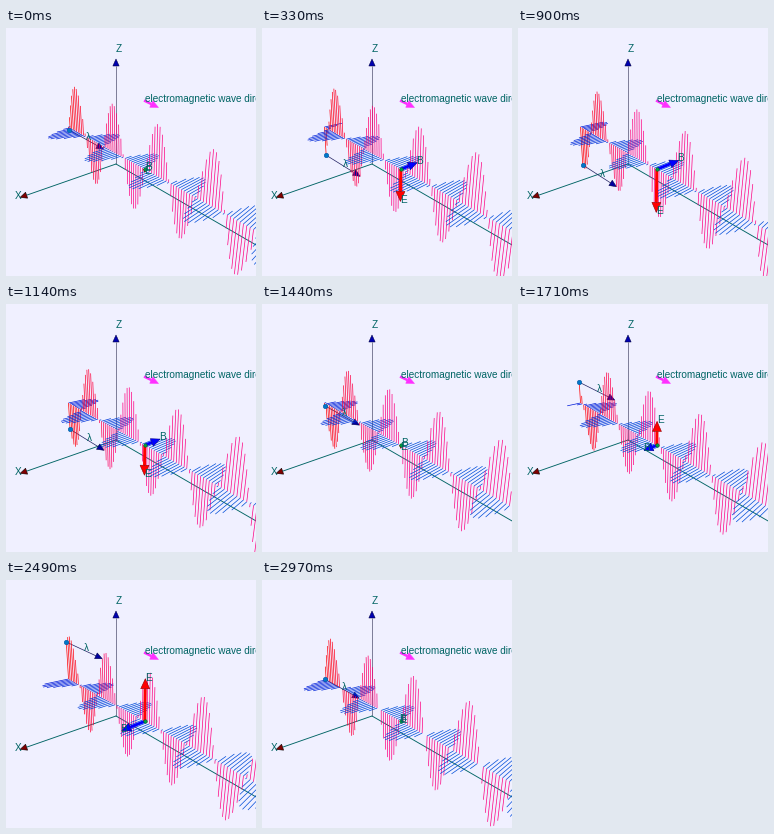
Write a matplotlib script that moves like this. It is 250 by 248 pixels and loops after 3000 ms.

```python
import numpy as np
import matplotlib.pyplot as plt
from matplotlib.animation import FuncAnimation
from matplotlib.collections import LineCollection

W, H, DPI = 250, 248, 72
FRAMES, STEP = 100, 30
BG, TEAL = "#f0f0ff", "#006464"
THIN = 0.7

# Perspective: start of the wave, vanishing points and depth weights
START = np.array([62.5, 99.0])
VP_X, VP_Y, VP_Z = np.array([[443, 18], [-338, -123], [126, 1170]], float)
K_X, K_Y, K_Z = -0.07, -0.08, -0.0395

PER_WAVE, WAVES = 20, 5
S = np.arange(PER_WAVE * WAVES + 1) / PER_WAVE


def project(s, e=0.0, b=0.0):
    """Screen position at s wavelengths, electric height e, magnetic reach b."""
    s, e, b = np.broadcast_arrays(s, e, b)
    ky, kz, kx = (v[..., None] for v in (s * K_Y, e * K_Z, b * K_X))
    return (START + ky * VP_Y + kz * VP_Z + kx * VP_X) / (1 + ky + kz + kx)


def field(s, phase):
    return np.sin(2 * np.pi * (s - phase))


plt.rcParams["font.family"] = "Liberation Sans"
fig = plt.figure(figsize=(W / DPI, H / DPI), dpi=DPI, facecolor=BG)
ax = fig.add_axes([0, 0, 1, 1])
ax.set(xlim=(0, W), ylim=(H, 0))
ax.axis("off")


def label(x, y, text, **kw):
    return ax.text(x, y, text, fontsize=10, color=TEAL, zorder=6, **kw)


class Arrow:
    def __init__(self, color, line, width, head, edge=None, z=4):
        self.head = head
        self.line, = ax.plot([], [], color=line, lw=width, zorder=z,
                             solid_capstyle="butt")
        self.tip, = ax.fill([0, 0, 0], [0, 0, 0], fc=color, ec=edge or color,
                            lw=0.5, zorder=z + 0.1)

    def place(self, a, b):
        a, b = np.asarray(a, float), np.asarray(b, float)
        size = np.hypot(*(b - a))
        u = (b - a) / max(size, 1e-6)
        n = np.array([-u[1], u[0]])
        h = min(self.head, size)
        base = b - u * h
        self.line.set_data(*np.transpose([a, base]))
        self.tip.set_xy([b, base + n * h * 0.45, base - n * h * 0.45])
        return self


# Fixed axes and direction mark
Arrow("#0000b0", "#505070", THIN, 7, "#000040", 1).place((110, 136), (110, 31))
Arrow("#800000", TEAL, 0.9, 7, "black", 1).place((110, 136), (14, 169.5))
far = VP_Y + (np.array([110, 136]) - VP_Y) * 1.4
ax.plot(*np.transpose([(110, 136), far]), color=TEAL, lw=0.9, zorder=1)
label(110, 24, "Z")
label(9, 171, "X")
label(139, 74, "electromagnetic wave direction", clip_on=True)
Arrow("#ff30ff", "#ff30ff", 2.5, 8, z=5).place((138, 72.5), (152.5, 79.5))

# Stems, electric and magnetic alternating along the wave
mix = np.clip(S / 1.5, 0, 1)[:, None]
red = (1 - mix) * [1, 0, 0] + mix * [1, 0, 0.5]
blue = (1 - mix) * [0, 0.1, 0.85] + mix * [0, 0.3, 0.85]
stems = LineCollection([], colors=np.stack([blue, red], 1).reshape(-1, 3),
                       linewidths=THIN, zorder=2)
ax.add_collection(stems)
axis = project(S)

span = Arrow("#0000a0", "#202060", THIN, 7, "#000040", 1.5)
dot, = ax.plot([], [], "o", ms=4.5, mfc="#0078c8", mec="#0050a0", mew=0.5,
               zorder=3)
lam = label(0, 0, "λ")
b_arrow = Arrow("#0000ff", "#0000ff", 3, 9, "#000080", 4)
e_arrow = Arrow("#ff0000", "#ff0000", 3, 10, "#800000", 4.5)
ax.plot(*project(2), "o", ms=3.5, mfc="#00a040", mec="#006020", mew=0.5,
        zorder=4.8)
e_text = label(0, 0, "E", ha="center", va="center")
b_text = label(0, 0, "B", ha="center", va="center")


def update(i):
    phase = (i + 1) / FRAMES
    v = field(S, phase)
    mag = np.stack([axis, project(S, b=v)], 1)
    ele = np.stack([axis, project(S, e=v)], 1)
    stems.set_segments(np.stack([mag, ele], 1).reshape(-1, 2, 2))

    v0 = field(0, phase)
    a, b = project(0, v0), project(1, v0)
    span.place(a, b)
    dot.set_data([a[0]], [a[1]])
    lam.set_position((a + b) / 2 + (0, 1))

    mid, e_tip, b_tip = project(2), project(2, v0), project(2, 0, v0)
    e_arrow.place(mid, e_tip)
    b_arrow.place(mid, b_tip)
    e_text.set_position(e_tip + (3, -1))
    b_text.set_position(b_tip + (2, -2))
    return []


anim = FuncAnimation(fig, update, frames=FRAMES, interval=STEP, repeat=True,
                     repeat_delay=0, init_func=lambda: update(0))
plt.show()
```
